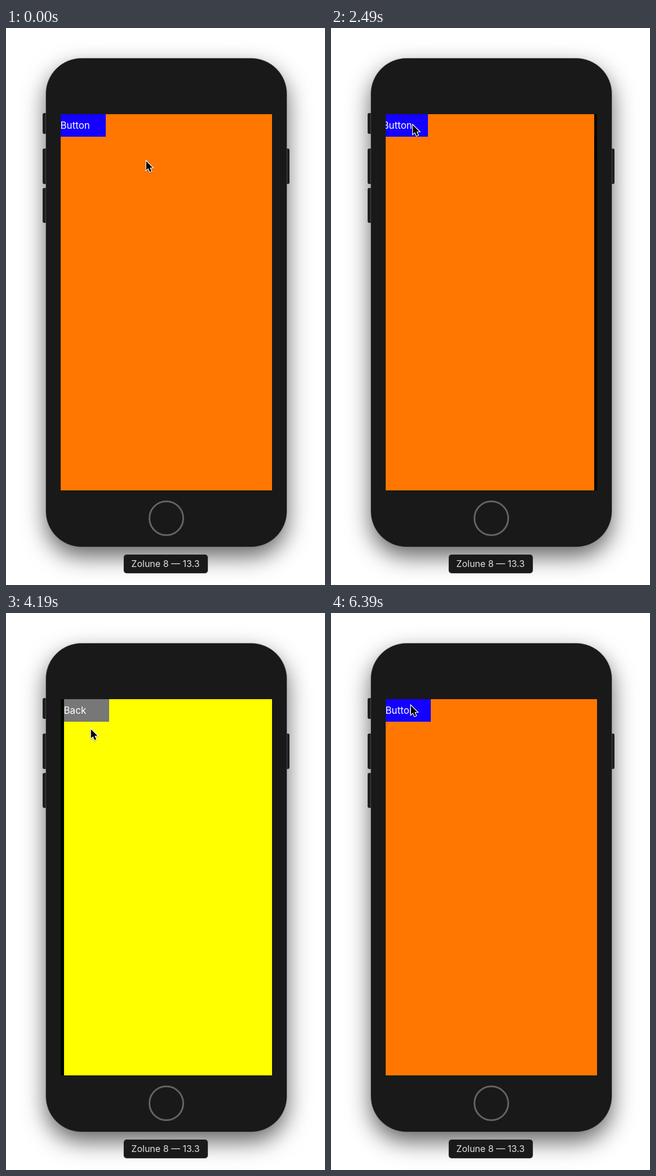
An HTML page for the animation above (6.49 s loop, 566 by 989 pixels).

```html
<!DOCTYPE html>
<html lang="en">
<head>
<meta charset="utf-8">
<title>Page transitions</title>
<style>
html, body { margin: 0; width: 100%; height: 100%; overflow: hidden; background: #fff; }
body { position: relative; font-family: Inter, Roboto, sans-serif; }
body > *, .page { position: absolute; box-sizing: border-box; }
.key { width: 10px; border-radius: 3px; background: #2a2a2a; }
#phone {
  left: 71px; top: 53.5px; width: 426.5px; height: 867px; border-radius: 63px;
  background: #191919;
  box-shadow: 0 0 0 .7px rgba(110, 110, 110, .8), 0 17px 42px rgba(0, 0, 0, .62);
}
#home {
  left: 253px; top: 839px; width: 63px; height: 63px;
  border: 3px solid #646464; border-radius: 50%;
}
#label {
  left: 208.5px; top: 934.5px; width: 149px; height: 33px; border-radius: 5px;
  background: #1a1a1a; box-shadow: 0 0 0 .7px rgba(150, 150, 150, .6);
  color: #e2e2e2; font-size: 16px; line-height: 33px; text-align: center; white-space: nowrap;
}
#screen { left: 96.5px; top: 153px; width: 375px; height: 668px; overflow: hidden; background: #000; }
.page { inset: 0; }
.button { width: 80px; height: 40px; color: #fff; font-size: 17px; line-height: 41px; }
#cursor { left: 0; top: 0; width: 16px; height: 24px; overflow: visible; filter: drop-shadow(0 1px 1px rgba(0, 0, 0, .35)); }
</style>
</head>
<body>
<div class="key" style="left:64.5px;top:151px;height:36.5px"></div>
<div class="key" style="left:64.5px;top:214px;height:63px"></div>
<div class="key" style="left:64.5px;top:283.5px;height:62.5px"></div>
<div class="key" style="left:493px;top:214px;height:63px"></div>
<div id="phone"></div>
<div id="screen">
  <div class="page" style="background:#ff7700">
    <div class="button" style="background:#1400ff">Button</div>
  </div>
  <div class="page" style="background:#00ff00">
    <div class="button" style="background:#ff7700">Back</div>
    <div class="button" style="background:#780078">Button</div>
  </div>
  <div class="page" style="background:#ffff00">
    <div class="button" style="background:#777">Back</div>
  </div>
</div>
<div id="home"></div>
<div id="label">Zolune 8 — 13.3</div>
<svg id="cursor" viewBox="0 0 16 24">
  <path d="M.8 1.5V17.3L4.5 13.9L7.2 20.4L10 19.2L7.3 12.9H12.2Z"
        fill="#000" stroke="#fff" stroke-width="2.4" paint-order="stroke"/>
</svg>
<script>
const LOOP = 6490, STEP = 100, FIRST = 90, SLIDE = 500, WIDTH = 375;
const pages = [...document.querySelectorAll('.page')];
const cursor = document.getElementById('cursor');

// [start time, page left, page entered]
const slides = [
  [837, 0, 1], [2031, 1, 0], [2828, 0, 1],
  [3735, 1, 2], [4670, 2, 1], [5850, 1, 0]
];

// [time, x, y] of the pointer tip
const moves = [
  [0, 248, 235], [190, 246, 258], [690, 150, 178], [1190, 148, 174],
  [2490, 144.5, 171], [3190, 143.5, 170], [3590, 150, 205],
  [4190, 150, 205], [4490, 143, 164], [4990, 142.5, 163], [6390, 141, 163]
];

// cubic-bezier(.42, 0, .58, 1)
function easeInOut(x) {
  let lo = 0, hi = 1;
  for (let i = 0; i < 24; i++) {
    const s = (lo + hi) / 2, q = 1 - s;
    if (1.26 * s * q * q + 1.74 * s * s * q + s * s * s < x) lo = s; else hi = s;
  }
  return lo * lo * (3 - 2 * lo);
}

function place(page, x, opacity) {
  page.style.visibility = 'visible';
  page.style.transform = `translateX(${x}px)`;
  page.style.opacity = opacity;
}

function drawPages(t) {
  for (const p of pages) p.style.visibility = 'hidden';
  const slide = slides.filter(s => s[0] <= t).pop();
  if (!slide) return place(pages[0], 0, 1);
  const [start, from, to] = slide;
  const rest = 1 - easeInOut(Math.min(1, (t - start) / SLIDE));
  const dir = Math.sign(to - from);
  if (rest > .0005) place(pages[from], Math.round(dir * (rest - 1) * WIDTH), rest * (2 - rest));
  place(pages[to], Math.round(dir * rest * WIDTH), 1);
}

function drawCursor(t) {
  let i = 0;
  while (i < moves.length - 2 && moves[i + 1][0] <= t) i++;
  const [t0, x0, y0] = moves[i], [t1, x1, y1] = moves[i + 1];
  const k = Math.min(1, (t - t0) / (t1 - t0));
  const e = k * k * (3 - 2 * k);
  cursor.style.transform = `translate(${x0 + (x1 - x0) * e}px, ${y0 + (y1 - y0) * e}px)`;
}

const hold = t => t < FIRST ? 0 : FIRST + Math.floor((t - FIRST) / STEP) * STEP;

const begin = performance.now();
function tick() {
  const t = hold((performance.now() - begin) % LOOP);
  drawPages(t);
  drawCursor(t);
  requestAnimationFrame(tick);
}
tick();
</script>
</body>
</html>
```
